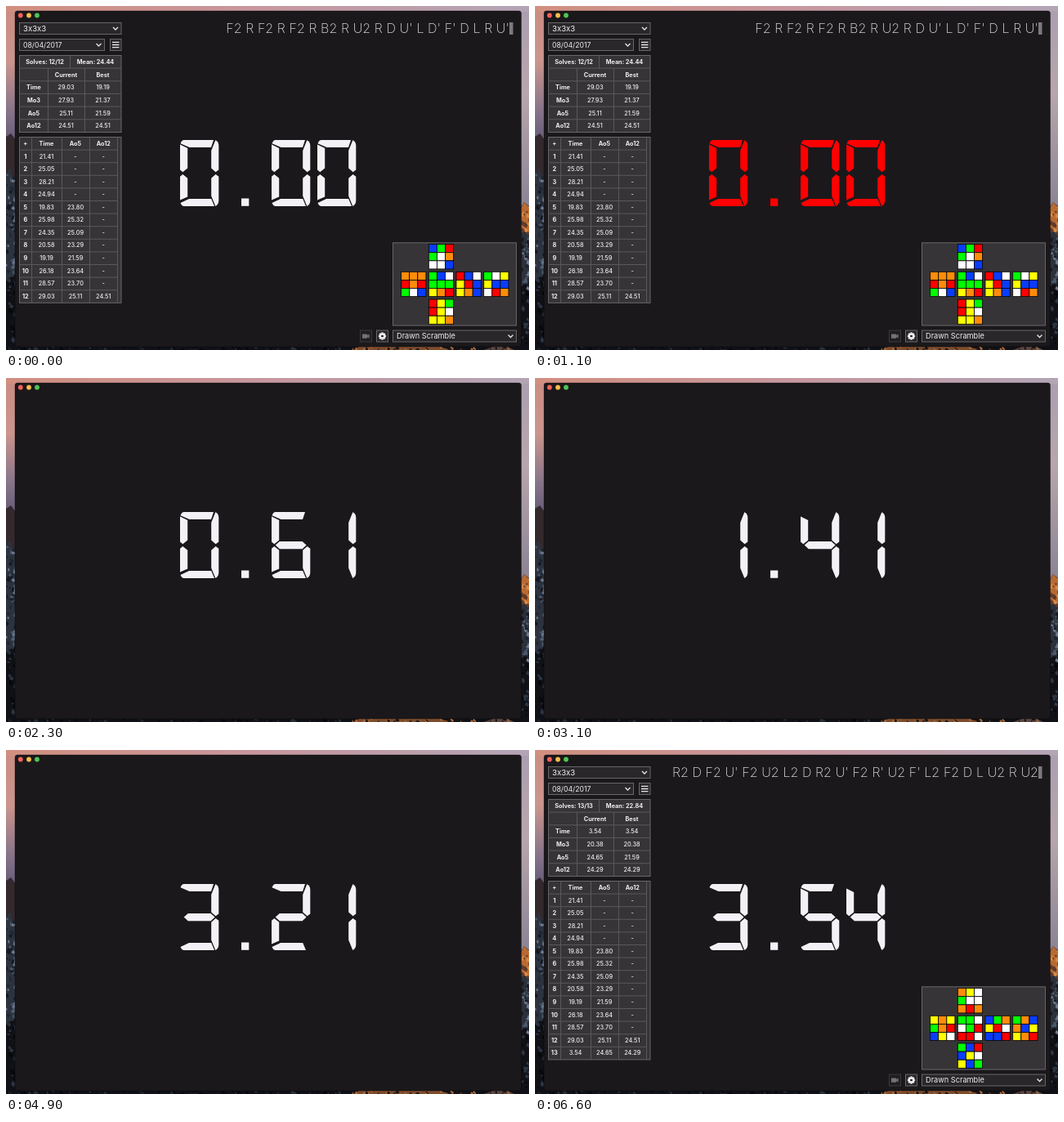
Animation of 640 by 421 pixels, one loop 6700 ms. Source, as an HTML page:

```html
<!DOCTYPE html>
<html>
<head>
<meta charset="utf-8">
<style>
html, body { margin: 0; width: 100%; height: 100%; overflow: hidden; background: #1b181b; }
svg { display: block; width: 640px; height: 421px; font-family: Inter, "Open Sans", sans-serif; }
.box { fill: #2a272b; stroke: #69666a; }
.panel { fill: #373438; stroke: #69666a; }
.line { fill: none; stroke: #5b585c; }
.icon { fill: none; stroke: #e8e6e9; stroke-width: 1.3; }
</style>
</head>
<body>
<svg viewBox="0 0 640 421">
  <defs>
    <linearGradient id="top"><stop stop-color="#d18f80"/><stop offset=".5" stop-color="#c6979f"/><stop offset="1" stop-color="#b3a5b6"/></linearGradient>
    <linearGradient id="left" x2="0" y2="1"><stop stop-color="#c98c82"/><stop offset=".16" stop-color="#cb958d"/><stop offset=".3" stop-color="#89758a"/><stop offset=".4" stop-color="#625a76"/></linearGradient>
    <linearGradient id="right" x2="0" y2="1"><stop stop-color="#aa9eb0"/><stop offset=".25" stop-color="#b8a6ac"/><stop offset=".58" stop-color="#8b8495"/></linearGradient>
  </defs>
  <rect width="320" height="421" fill="url(#left)"/>
  <rect x="320" width="320" height="421" fill="url(#right)"/>
  <rect width="640" height="7" fill="url(#top)"/>
  <path d="M0 160L6 156L12 164V421H0Z" fill="#33282c"/>
  <path d="M0 205L5 198L12 222V421H0Z" fill="#2c333f"/>
  <path d="M629 248L634 240L640 245V421H629Z" fill="#2c313c"/>
  <path d="M629 250L634 240L640 246V280L634 274L629 278Z" fill="#b96a32"/>
  <path d="M0 335L12 328V421H0ZM629 345L640 335V421H629ZM0 415H640V421H0Z" fill="#101116"/>
  <path d="M424 421L432 417H530L546 421Z" fill="#7d4c2c"/>
  <path d="M585 421L596 417H614L622 421Z" fill="#5b4640"/>
  <g id="rocks"></g>
  <rect x="11" y="6" width="619.5" height="411" rx="3" fill="#1b181b" stroke="#000" stroke-opacity=".35"/>
  <g id="screen"></g>
  <circle cx="17.8" cy="11.5" r="2.9" fill="#f5605a"/>
  <circle cx="28" cy="11.5" r="2.9" fill="#f9be4c"/>
  <circle cx="38" cy="11.5" r="2.9" fill="#4fc455"/>
</svg>
<script>
const LOOP = 6700, START = 1690, STOP = 5230;
const screen = document.getElementById('screen');
const clamp = v => Math.max(0, Math.min(1, v));

// Light and dark shards on the mountains
let seed = 7;
const random = () => (seed = seed * 16807 % 2147483647) / 2147483647;
function shards(count, x, y, w, h, colors) {
  let out = '';
  for (let i = 0; i < count; i++) {
    const px = x + random() * w, py = y + random() * h, a = 1 + random() * 3, b = 2 + random() * 6;
    out += `<path d="M${px} ${py}l${a} ${b / 2}l${-a / 2} ${b / 2}l${-a} ${-b / 3}Z" fill="${colors[i % colors.length]}"/>`;
  }
  return out;
}
const snow = ['#6c7a90', '#15181f', '#4b586b', '#20252e'];
document.getElementById('rocks').innerHTML =
  shards(60, 0, 205, 11, 120, snow) + shards(25, 0, 325, 11, 90, ['#2b3543', '#07080b']) +
  shards(40, 631, 280, 9, 65, snow) + shards(20, 631, 345, 9, 70, ['#2b3543', '#07080b']) +
  shards(16, 631, 243, 9, 34, ['#d98a45', '#5c3a2a']) +
  shards(70, 0, 416, 420, 4, ['#272e3a', '#07080b']) + shards(40, 424, 416, 200, 4, ['#a9683a', '#1a1516']);

const text = (s, x, y, size = 7.3, weight = 500, anchor = 'middle', fill = '#f0eef1') =>
  `<text x="${x}" y="${y}" font-size="${size}" font-weight="${weight}" text-anchor="${anchor}" fill="${fill}">${s}</text>`;
const bold = (s, x, y) => text(s, x, y, 7.3, 700);
const rect = (cls, x, y, w, h) => `<rect class="${cls}" x="${x}" y="${y}" width="${w}" height="${h}"/>`;
const path = (cls, d) => `<path class="${cls}" d="${d}"/>`;
const select = (label, x, y, w, size) => rect('box', x, y, w, 14) +
  text(label, x + 4.5, y + 10.3, size, 400, 'start') + path('icon', `M${x + w - 10} ${y + 5.5}l3 3l3 -3`);

// Cube: each sticker is a point just outside its face
const faces = {
  U: { n: [0, 1, 0], color: '#fff', x: 517, y: 291.3, at: (r, c) => [c - 1, 2, r - 1] },
  L: { n: [-1, 0, 0], color: '#ff8c0a', x: 483.3, y: 325, at: (r, c) => [-2, 1 - r, c - 1] },
  F: { n: [0, 0, 1], color: '#0f0', x: 517, y: 325, at: (r, c) => [c - 1, 1 - r, 2] },
  R: { n: [1, 0, 0], color: '#f00', x: 550.7, y: 325, at: (r, c) => [2, 1 - r, 1 - c] },
  B: { n: [0, 0, -1], color: '#0a3cff', x: 584.4, y: 325, at: (r, c) => [1 - c, 1 - r, -2] },
  D: { n: [0, -1, 0], color: '#ff0', x: 517, y: 358.7, at: (r, c) => [c - 1, -2, 1 - r] }
};
const dot = (a, b) => a[0] * b[0] + a[1] * b[1] + a[2] * b[2];
const cross = (a, b) => [0, 1, 2].map(i => a[(i + 1) % 3] * b[(i + 2) % 3] - a[(i + 2) % 3] * b[(i + 1) % 3]);
const cells = [...Array(9).keys()].map(i => [Math.floor(i / 3), i % 3]);

function drawCube(scramble) {
  const stickers = Object.values(faces).flatMap(f =>
    cells.map(([r, c]) => ({ p: f.at(r, c), color: f.color })));
  for (const move of scramble.split(' ')) {
    const n = faces[move[0]].n;
    const turns = move[1] === '2' ? 2 : move[1] ? 3 : 1;
    for (let k = 0; k < turns; k++)
      for (const s of stickers) {
        const d = dot(n, s.p);
        if (d < 1) continue;
        const side = cross(n, s.p);
        s.p = n.map((v, i) => v * d - side[i]);
      }
  }
  return Object.values(faces).map(f => cells.map(([r, c]) => {
    const spot = f.at(r, c);
    const s = stickers.find(s => s.p.every((v, i) => v === spot[i]));
    return `<rect x="${f.x + c * 10.1 + .3}" y="${f.y + r * 10.1 + .3}" width="10.1" height="10.1" fill="${s.color}" stroke="#080808" stroke-width=".85"/>`;
  }).join('')).join('');
}

const times = ['21.41', '25.05', '28.21', '24.94', '19.83', '25.98', '24.35', '20.58', '19.19', '26.18', '28.57', '29.03', '3.54'];
const ao5 = ['23.80', '25.32', '25.09', '23.29', '21.59', '23.64', '23.70', '25.11', '24.65'];
const ao12 = ['24.51', '24.29'];
const sessions = [
  { count: 12, mean: '24.44', scramble: "F2 R F2 R F2 R B2 R U2 R D U' L D' F' D L R U'",
    stats: [['Time', '29.03', '19.19'], ['Mo3', '27.93', '21.37'], ['Ao5', '25.11', '21.59'], ['Ao12', '24.51', '24.51']] },
  { count: 13, mean: '22.84', scramble: "R2 D F2 U' F2 U2 L2 D R2 U' F2 R' U2 F' L2 F2 D L U2 R U2",
    stats: [['Time', '3.54', '3.54'], ['Mo3', '20.38', '20.38'], ['Ao5', '24.65', '21.59'], ['Ao12', '24.29', '24.29']] }
];

function drawSession({ count, mean, scramble, stats }) {
  const row = 15.6, bottom = 160.5 + (count + 1) * row;
  let out = select('3x3x3', 16.5, 20.5, 124.5, 9.6) + select('08/04/2017', 16.5, 40.5, 104, 8.7) +
    rect('box', 127.5, 40.5, 13.5, 14) + path('icon', 'M130 44.3h8.5m-8.5 3.2h8.5m-8.5 3.2h8.5');

  out += rect('panel', 16.5, 60.5, 124.5, 94);
  for (let i = 1; i < 6; i++) out += path('line', `M16.5 ${60.5 + i * 15.65}h124.5`);
  out += path('line', 'M78.5 60.5v15.6M51.5 76v78M96.5 76v78') +
    bold(`Solves: ${count}/${count}`, 47.5, 71) + bold(`Mean: ${mean}`, 109.5, 71) +
    bold('Current', 73.5, 86.8) + bold('Best', 118.5, 86.8);
  stats.forEach((s, i) => {
    const y = 102.4 + i * 15.65;
    out += bold(s[0], 34, y) + text(s[1], 73.5, y) + text(s[2], 118.5, y);
  });

  out += rect('panel', 16.5, 160.5, 124.5, bottom - 160.5) +
    path('line', `M31.5 160.5V${bottom}M68.5 160.5V${bottom}M102.5 160.5V${bottom}M136.5 160.5V${bottom}`);
  for (let i = 0; i <= count; i++) {
    const y = 171 + i * 15.55;
    const cols = i ? [i, times[i - 1], ao5[i - 5] || '-', ao12[i - 12] || '-'] : ['+', 'Time', 'Ao5', 'Ao12'];
    if (i) out += path('line', `M16.5 ${160.5 + i * row}h120`);
    cols.forEach((s, k) => out += (i && k ? text : bold)(s, [23.8, 49.5, 85, 119.3][k], y));
  }

  return out + `<g word-spacing=".17">${text(scramble, 616, 33, 16, 200, 'end', '#e4e2e5')}</g>` +
    '<rect x="616" y="20" width="4.5" height="15" fill="#7d7a7e"/>' +
    rect('panel', 473.5, 289.8, 151, 101.2) + drawCube(scramble);
}
const views = sessions.map(drawSession);

function drawTools(cameraOpacity) {
  let gear = '';
  for (let a = 0; a < 360; a += 45)
    gear += `<rect x="459.3" y="399.4" width="2.4" height="3" fill="#f0eef1" transform="rotate(${a} 460.5 404)"/>`;
  return `<g opacity="${cameraOpacity}">${rect('box', 433.5, 397, 14, 14)}
    <path d="M436 401.5h6v1.6l2.5 -1.6v5.2l-2.5 -1.6v1.6h-6Z" fill="#f0eef1"/></g>` +
    rect('box', 453.5, 397, 14, 14) + gear +
    '<circle cx="460.5" cy="404" r="2.5" fill="none" stroke="#f0eef1" stroke-width="1.9"/>' +
    select('Drawn Scramble', 473.5, 397, 151, 9.2);
}

const segments = {
  a: 'M.5 4.3Q2 0 5 0H41L38 9H11.5Z',
  b: 'M43.3 .2Q47.3 2 47.3 7V36.5L43.6 39.3L38.2 34.5V13Z',
  c: 'M43.6 42L47.3 44.8V74Q47.3 79 43.3 81L38.2 68.5V46.8Z',
  d: 'M.5 76.9L11 72H38.2L42 81H5Q2 81 .5 76.9Z',
  e: 'M0 44.8L3.3 42L9.2 46.8V69.6L0 73.6Z',
  f: 'M0 5.4L9.2 9.9V34.5L3.3 39.3L0 36.5Z',
  g: 'M4.7 40.6L9.8 36H37.6L42.6 40.6L37.6 45.2H9.8Z'
};
const digits = ['abcdef', 'bc', 'abged', 'abgcd', 'fgbc', 'afgcd', 'afgecd', 'abc', 'abcdefg', 'abcdfg'];

function drawTime(ms, color) {
  const cs = Math.round(ms / 10);
  const shown = [Math.floor(cs / 100), Math.floor(cs / 10) % 10, cs % 10];
  return `<g fill="${color}"><rect x="288" y="235.5" width="9.3" height="9.3"/>` + shown.map((n, i) =>
    `<path transform="translate(${[213, 325, 381][i]} 164)" d="${[...digits[n]].map(s => segments[s]).join('')}"/>`).join('') + '</g>';
}

function render(t) {
  const done = t >= STOP;
  const panels = done ? clamp((t - 5200) / 250) : clamp((1510 - t) / 200);
  const tools = done ? clamp((t - 5220) / 350) : clamp((1600 - t) / 250);
  const color = t >= 900 && t < 1400 ? '#f00' : t >= 1400 && t < START ? '#0f0' : '#f4f1f6';
  const camera = !done && tools < 1 ? 1 : .42;
  screen.innerHTML =
    (panels ? `<g opacity="${panels}">${views[+done]}</g>` : '') +
    (tools ? `<g opacity="${tools}">${drawTools(camera)}</g>` : '') +
    drawTime(Math.max(0, Math.min(t, STOP) - START), color);
}

const begin = performance.now();
let last = -1;
function frame() {
  const t = Math.floor((performance.now() - begin) % LOOP / 100) * 100;
  if (t !== last) render(last = t);
  requestAnimationFrame(frame);
}
frame();
</script>
</body>
</html>
```
